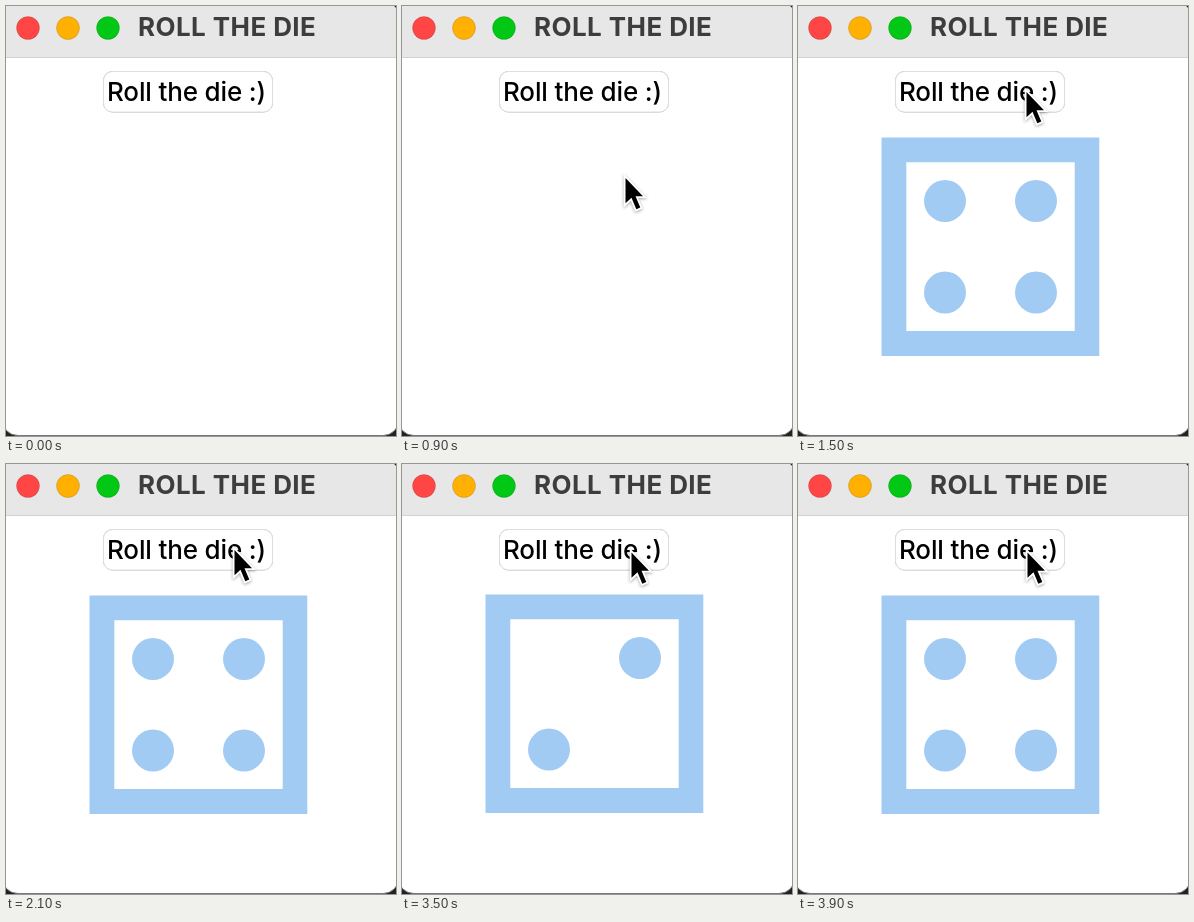
These frames come from a looping animation (390x430 px, 5500 ms). An HTML page:

```html
<!DOCTYPE html>
<html lang="en">
<head>
<meta charset="utf-8">
<title>Roll the die</title>
<style>
  html, body { margin: 0; width: 100%; height: 100%; overflow: hidden; background: #222; }
  svg { display: block; }
  text { font: 500 26px Inter, "Open Sans", sans-serif; letter-spacing: -.15px; }
  .title { font-weight: 700; letter-spacing: .42px; fill: #3d3d3d; }
  .lights circle { stroke: rgba(0, 0, 0, .12); }
  .die { fill: #a2cbf4; }
  .button { filter: drop-shadow(0 .8px .6px rgba(0, 0, 0, .3)); }
  #cursor { filter: drop-shadow(0 1.5px 1.5px rgba(0, 0, 0, .35)); }
</style>
</head>
<body>
<svg width="390" height="430" viewBox="0 0 390 430">
  <rect x="-4" y="-4" width="397" height="433.5" rx="16" fill="#fff" stroke="#777"/>
  <path d="M0 0H388L390 2V51H0Z" fill="#e7e7e7"/>
  <path d="M0 51.5H390" stroke="#d2d2d2"/>
  <g class="lights">
    <circle cx="22" cy="22" r="11.5" fill="#ff4644"/>
    <circle cx="62" cy="22" r="11.5" fill="#ffb000"/>
    <circle cx="102" cy="22" r="11.5" fill="#00c814"/>
  </g>
  <text class="title" x="132" y="30">ROLL THE DIE</text>
  <rect class="button" x="97.5" y="65.5" width="169" height="40.5" rx="9" fill="#fff" stroke="#dedede"/>
  <text x="101" y="94.5">Roll the die :)</text>
  <g class="die" id="die">
    <path fill-rule="evenodd" d="M83.5 131.5H301.3V350H83.5ZM108.3 156.3V325H276.7V156.3Z"/>
    <g>
      <circle cx="238" cy="195" r="21"/>
      <circle cx="147" cy="286.5" r="21"/>
    </g>
    <g id="otherPair">
      <circle cx="147" cy="195" r="21"/>
      <circle cx="238" cy="286.5" r="21"/>
    </g>
  </g>
  <path id="cursor" d="M0 0V25.3L6 19.8L10.8 31.3L14.8 29.6L10 18.2H17.5Z"
        stroke="#fff" stroke-width="3.6" paint-order="stroke"/>
</svg>
<script>
  const LOOP = 5500;
  const byId = id => document.getElementById(id);
  const die = byId('die'), otherPair = byId('otherPair'), cursor = byId('cursor');

  // Each pose holds until the next: [time, x, y]
  const cursorPoses = [
    [700, 229, 402], [800, 226, 280], [900, 223.5, 172], [1000, 225, 122],
    [1100, 227, 98], [1200, 227, 86], [1300, 228.5, 86],
    [3200, 230.5, 88], [3500, 229.5, 88.5]
  ];

  // Number of pips showing from each time on
  const rolls = [[1500, 4], [2800, 2], [3800, 4]];

  const current = (steps, t) => steps.filter(step => step[0] <= t).pop();

  function show(element, visible) {
    element.setAttribute('visibility', visible ? 'inherit' : 'hidden');
  }

  function draw(now) {
    const t = now % LOOP;
    const pose = current(cursorPoses, t), roll = current(rolls, t);
    show(cursor, pose);
    if (pose) cursor.setAttribute('transform', `translate(${pose[1]} ${pose[2]})`);
    show(die, roll);
    if (roll) {
      show(otherPair, roll[1] === 4);
      die.setAttribute('transform', `translate(0 ${roll[1] === 4 ? 0 : -1})`);
    }
    requestAnimationFrame(draw);
  }
  draw(performance.now());
</script>
</body>
</html>
```
